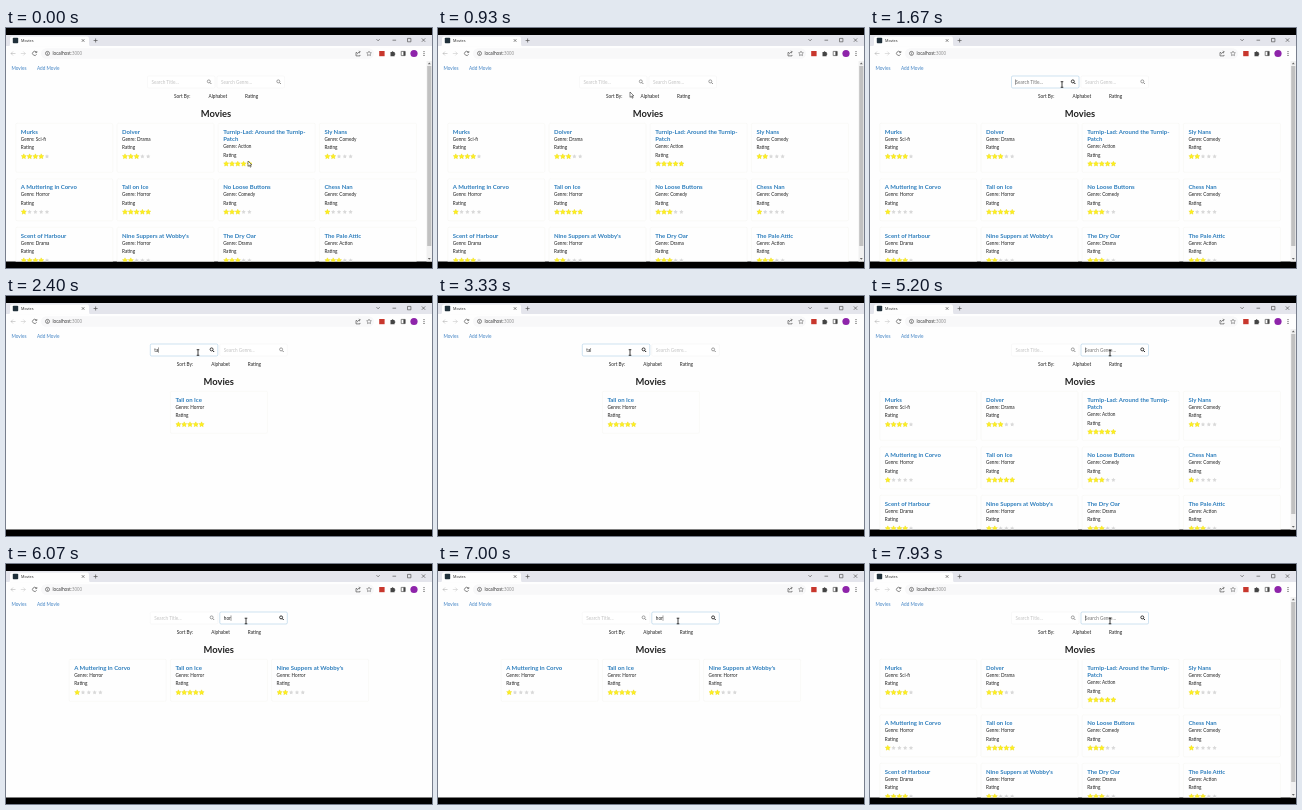
Recreate the animation shown at these times as an HTML page. Size 426x240 px, loop 8000 ms.

```html
<!DOCTYPE html>
<html lang="en">
<head>
<meta charset="utf-8">
<title>Movies</title>
<style>
  html, body { margin: 0; width: 100%; height: 100%; overflow: hidden; background: #000; }
  svg { display: block; width: 100%; height: 100%; }
  text { font-family: Lato, sans-serif; font-size: 4.7px; fill: #222; white-space: pre; }
  .ui { font-family: "Open Sans", sans-serif; font-size: 4.4px; }
  .tab { font-size: 3.8px; }
  .link { fill: #4183c4; }
  .title { font-size: 6px; font-weight: 700; fill: #2f7fbd; }
  .heading { font-size: 9.4px; font-weight: 700; text-anchor: middle; }
  .line { fill: none; stroke: #555; stroke-width: .7; }
</style>
</head>
<body>
<svg viewBox="0 0 426 240" preserveAspectRatio="none">
  <defs><clipPath id="view"><rect y="7" width="426" height="226.5"/></clipPath></defs>
  <rect width="426" height="240"/>
  <g clip-path="url(#view)">
    <g id="page"></g>
    <g id="browser"></g>
    <g id="pointer"></g>
  </g>
</svg>
<script>
const LOOP = 8000;
const BLINK = 530;

// "|" marks a line break in a title
const movies = [
  ["Murks", "Sci-fi", 4], ["Dolver", "Drama", 3],
  ["Turnip-Lad: Around the Turnip-|Patch", "Action", 5], ["Sly Nans", "Comedy", 2],
  ["A Muttering in Corvo", "Horror", 1], ["Tall on Ice", "Horror", 5],
  ["No Loose Buttons", "Comedy", 3], ["Chess Nan", "Comedy", 1],
  ["Scent of Harbour", "Drama", 4], ["Nine Suppers at Wobby's", "Horror", 2],
  ["The Dry Oar", "Drama", 3], ["The Pale Attic", "Action", 3]
].map(([title, genre, rating]) => ({ title, genre, rating }));

// time, focused field, its text
const inputs = [
  [0, "", ""], [1500, "title", ""], [2000, "title", "t"], [2200, "title", "ta"],
  [2500, "title", "tal"], [3600, "title", "ta"], [3750, "title", "t"], [3900, "title", ""],
  [4700, "genre", ""], [5270, "genre", "h"], [5500, "genre", "ho"], [5800, "genre", "hor"],
  [7130, "genre", "ho"], [7330, "genre", "h"], [7530, "genre", ""]
];

// time, x, y
const pointerPath = [
  [0, 242, 133], [150, 242, 133], [930, 192, 64], [1250, 192, 56.5],
  [3950, 192, 56.5], [4330, 233, 54], [4650, 240, 57], [LOOP, 240, 57]
];

const byId = id => document.getElementById(id);
const text = (x, y, content, cls = "", extra = "") =>
  `<text x="${x}" y="${y}" class="${cls}" ${extra}>${content}</text>`;
const rect = (x, y, w, h, fill, extra = "") =>
  `<rect x="${x}" y="${y}" width="${w}" height="${h}" fill="${fill}" ${extra}/>`;
const line = (d, extra = "") => `<path class="line" d="${d}" ${extra}/>`;
const lastBefore = (list, t) => list.filter(item => item[0] <= t).pop();

function starPath(cx, cy, r) {
  const points = Array.from({ length: 10 }, (_, i) => {
    const a = (i / 5 - .5) * Math.PI, d = i % 2 ? r * .5 : r;
    return `${(cx + d * Math.cos(a)).toFixed(2)},${(cy + d * Math.sin(a)).toFixed(2)}`;
  });
  return `M${points.join("L")}Z`;
}

function browser() {
  return rect(0, 7, 426, 11.5, "#e4e5ec") + rect(0, 18, 426, 15, "#fefefe") +
    `<path d="M2 18.5Q4 18.5 4 16V10.5Q4 8.5 6 8.5H81Q83 8.5 83 10.5V16Q83 18.5 85 18.5Z" fill="#fefefe"/>` +
    rect(6.8, 9.8, 5.4, 5.4, "#20303a", 'rx=".8"') + text(15, 14, "Movies", "ui tab") +
    line("M75.8 11.2l2.6 2.6m0-2.6l-2.6 2.6M87.6 12.5h4m-2-2v4") +
    line("M370.5 11.2l1.6 1.6 1.6-1.6M386.5 12.2h3.6M401.5 10.4h3.4v3.4h-3.4zM415.8 10.4l3.4 3.4m0-3.4l-3.4 3.4") +
    rect(35, 20.3, 333, 10.4, "#f8f8f9", 'rx="5.2"') +
    line("M9.5 25.5H5m2-2l-2 2 2 2", 'opacity=".35"') +
    line("M14.8 25.5h4.5m-2-2l2 2-2 2", 'opacity=".25"') +
    line("M30.4 24.2a2.1 2.1 0 1 0 .2 2M30.8 23v1.6h-1.6") +
    `<circle class="line" cx="41.5" cy="25.4" r="2"/>` + line("M41.5 25.2v1.3m0-2.4v.4") +
    text(46.5, 27, 'localhost<tspan fill="#888">:3000</tspan>', "ui") +
    line("M351 24.5h-1v3.4h4v-1M351.3 26.2q.2-2.2 2.8-2.2m-1-1.2l1.2 1.2-1.2 1.2") +
    `<path class="line" d="${starPath(363, 25.6, 2.5)}" style="stroke-width:.5"/>` +
    rect(373.2, 23, 5.4, 5.2, "#c8372d") +
    `<path d="M384.5 24h1.3a.8.8 0 0 1 1.6 0h1.2v1.3a.8.8 0 0 1 0 1.6v1.3h-4.1z" fill="#444"/>` +
    line("M395.2 23.4h4v4.2h-4z") + rect(397.4, 23.4, 1.8, 4.2, "#444") +
    `<circle cx="408" cy="25.5" r="3.6" fill="#8e24aa"/>` +
    [23.6, 25.5, 27.4].map(y => `<circle cx="418" cy="${y}" r=".55" fill="#444"/>`).join("");
}

function searchBox(x, name, focused, value, caretOn) {
  const label = `Search ${name}...`;
  const shade = focused ? "#777" : "#c4c4c4";
  const caretX = x + 4 + measure(value);
  return rect(x, 48, 67.5, 12, "#fff",
      `rx="1.3" stroke="${focused ? "#85b7d9" : "#f0f0f0"}" stroke-width=".4"`) +
    text(x + 4, 55.8, value || label, "", `style="fill:${value ? "#222" : shade}"`) +
    `<g opacity="${focused ? 1 : .5}"><circle cx="${x + 61.3}" cy="53.4" r="1.5" fill="none" stroke="#111" stroke-width=".8"/>` +
    `<path d="M${x + 62.4} 54.5l1.5 1.5" stroke="#111" stroke-width="1"/></g>` +
    (focused && caretOn ? rect(caretX, 51.4, .4, 5.4, "#111") : "");
}

const ruler = document.createElement("canvas").getContext("2d");
function measure(value) {
  ruler.font = "47px Lato, sans-serif";
  return ruler.measureText(value).width / 10;
}

function card(movie, x, top, height) {
  const lines = movie.title.split("|");
  const y = top + 7.4 * (lines.length - 1);
  const stars = Array.from({ length: 5 }, (_, i) => {
    const on = i < movie.rating;
    return `<path d="${starPath(x + 3 + 5.8 * i, y + 33.2, on ? 2.7 : 2.3)}" ` +
      (on ? `fill="#fff01e" stroke="#e2d000" stroke-width=".35"/>` : `fill="#d9d9d9"/>`);
  });
  return rect(x - 5, top, 97, height, "#fefefe", 'rx="1.3" stroke="#f0f0ea" stroke-width=".35"') +
    lines.map((s, i) => text(x, top + 10.4 + 7.4 * i, s, "title")).join("") +
    text(x, y + 17.2, `Genre: ${movie.genre}`) + text(x, y + 26, "Rating") + stars.join("");
}

function cards(list, center) {
  let out = "", top = 95.3;
  for (let i = 0; i < list.length; i += 4) {
    const row = list.slice(i, i + 4);
    const extra = row.some(m => m.title.includes("|")) ? 7 : 0;
    const left = center - row.length * 50.6 + 7.2;
    row.forEach((m, col) => out += card(m, left + col * 101.2, top, 42 + extra));
    top += 48.5 + extra;
  }
  return out;
}

function page(t) {
  const [since, focus, query] = lastBefore(inputs, t);
  const found = movies.filter(m => !query || m[focus].toLowerCase().includes(query));
  const scrolls = found.length > 8;
  const center = scrolls ? 210 : 212.8;
  const caretOn = Math.floor((t - since) / BLINK) % 2 === 0;
  const box = (x, name) => {
    const focused = focus === name.toLowerCase();
    return searchBox(x, name, focused, focused ? query : "", caretOn);
  };
  return rect(0, 33, 426, 201, "#fefefe") +
    text(5.5, 42.2, "Movies", "link") + text(31, 42.2, "Add Movie", "link") +
    box(center - 68.5, "Title") + box(center + 1, "Genre") +
    text(center - 42, 69.6, "Sort By:") + text(center - 7.5, 69.6, "Alphabet") +
    text(center + 29, 69.6, "Rating") + text(center, 89, "Movies", "heading") +
    cards(found, center) +
    (scrolls ? rect(420.5, 33, 5.5, 201, "#f1f1f1") + rect(421.2, 38, 4.1, 180, "#c1c1c1") +
      `<path d="M421.8 36.3l1.5-1.8 1.5 1.8zM421.8 230l1.5 1.8 1.5-1.8z" fill="#666"/>` : "");
}

function pointer(t) {
  const i = Math.max(1, pointerPath.findIndex(p => p[0] > t));
  const [t0, x0, y0] = pointerPath[i - 1], [t1, x1, y1] = pointerPath[i];
  const u = (t - t0) / (t1 - t0), e = u * u * (3 - 2 * u);
  const x = x0 + (x1 - x0) * e, y = y0 + (y1 - y0) * e;
  const shape = y > 48 && y < 60
    ? `<path d="M-1.3-2.8H1.3M0-2.8V2.8M-1.3 2.8H1.3" stroke="#111" stroke-width=".8"/>`
    : `<path d="M0 0V5.4L1.3 4.2 2.2 6.2 3.1 5.8 2.2 3.9H3.9Z" fill="#fff" stroke="#111" stroke-width=".5"/>`;
  return `<g transform="translate(${x} ${y})">${shape}</g>`;
}

let shownPage = "";
function draw(now) {
  const t = now % LOOP;
  const markup = page(t);
  if (markup !== shownPage) byId("page").innerHTML = shownPage = markup;
  byId("pointer").innerHTML = pointer(t);
  requestAnimationFrame(draw);
}

byId("browser").innerHTML = browser();
draw(performance.now());
</script>
</body>
</html>
```
